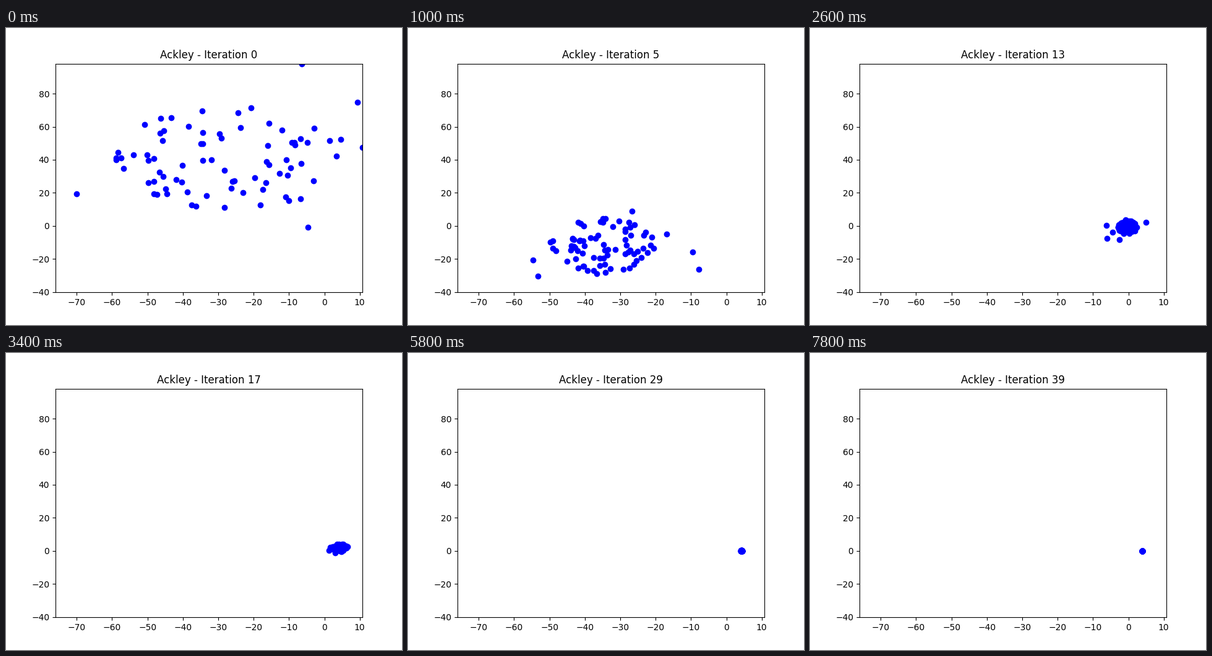
Animation, 640 px wide and 480 px high, one loop 8000 ms. Source, as a matplotlib script:

```python
import numpy as np
import matplotlib.pyplot as plt
from matplotlib.animation import FuncAnimation

COUNT, STEPS, STEP_MS = 80, 40, 200
rng = np.random.default_rng(4)


def cloud(center, half, strays=()):
    """A random elliptical swarm with a few stray particles, shuffled."""
    strays = np.reshape(strays, (-1, 2))
    n = COUNT - len(strays)
    r, a = rng.random(n) ** 0.55, rng.uniform(0, 2 * np.pi, n)
    core = np.array(center) + np.c_[r * np.cos(a), r * np.sin(a)] * half
    return rng.permutation(np.vstack([strays, core]))


# The swarm drifts down, turns right and contracts onto the optimum.
poses = {
    0: cloud((-26, 41), (34, 31), [(-70, 19.4), (-6.4, 98.1), (10.7, 47.5),
                                   (9.4, 74.8), (-4.6, -0.9)]),
    5: cloud((-35, -12), (15, 17), [(-54.7, -20.6), (-53.3, -30.3),
                                    (-7.8, -26.2), (-9.5, -15.7),
                                    (-16.9, -4.9), (-26.7, 9)]),
    9: cloud((-16.3, -10), (9, 9), [(-27.5, -13.8), (-26.3, -10.9),
                                    (-2, -5.2), (-21.8, -20.2)]),
    13: cloud((-0.4, -0.7), (3, 4.3), [(5, 2.2), (-6, -7.5), (-6.2, 0.4),
                                       (-2.5, -8.2), (-4.5, -4)]),
    21: cloud((3.8, 1.4), (1.1, 1.2)),
    29: cloud((4.3, 0), (0.25, 0.15)),
    39: cloud((3.95, -0.1), (0.02, 0.02)),
}
times = np.array(list(poses))
points = np.array(list(poses.values()))
centers = points.mean(axis=1)
spreads = points.std(axis=1)
shapes = (points - centers[:, None]) / spreads[:, None]
slopes = np.gradient(centers, times, axis=0)


def swarm(step):
    """Particle positions: the centre follows a spline, the spread decays."""
    k = min(np.searchsorted(times, step, side="right") - 1, len(times) - 2)
    h = times[k + 1] - times[k]
    w = (step - times[k]) / h
    v = 1 - w
    center = (v * v * (1 + 2 * w) * centers[k]
              + w * w * (3 - 2 * w) * centers[k + 1]
              + h * w * v * (v * slopes[k] - w * slopes[k + 1]))
    spread = spreads[k] ** v * spreads[k + 1] ** w
    shape = (v * shapes[k] + w * shapes[k + 1]) / np.hypot(v, w)
    return center + spread * shape


fig, ax = plt.subplots(figsize=(6.4, 4.8), dpi=100)
ax.set_xlim(-76, 10.75)
ax.set_ylim(-40.24, 98.2)
dots = ax.scatter(*swarm(0).T, color="blue")
title = ax.set_title("Ackley - Iteration 0")


def draw(step):
    dots.set_offsets(swarm(step))
    title.set_text(f"Ackley - Iteration {step}")
    return dots, title


anim = FuncAnimation(fig, draw, frames=STEPS, interval=STEP_MS, repeat=True)
plt.show()
```
